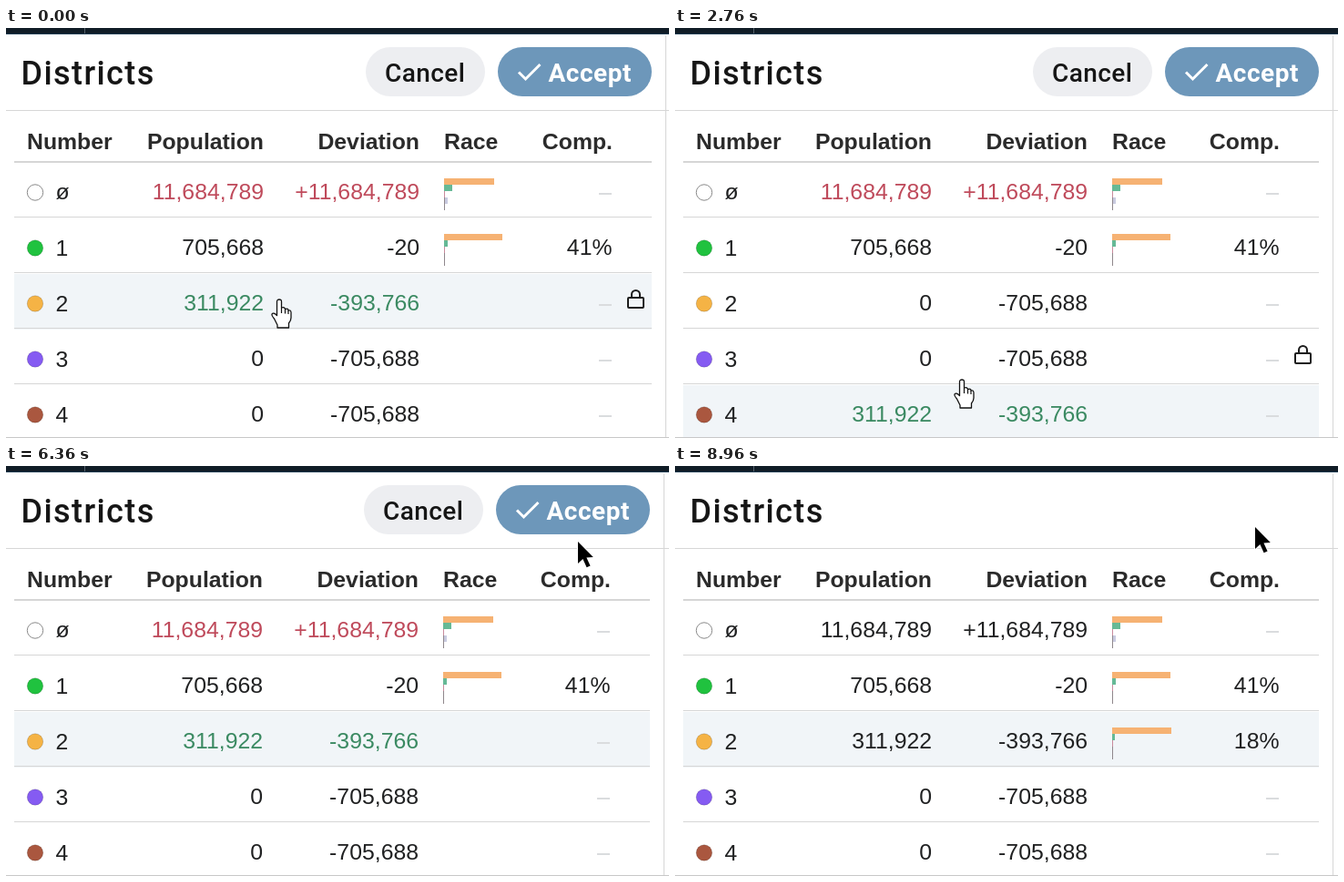
These frames come from a looping animation (728x450 px, 9.46 s). An HTML page with a canvas:

```html
<!DOCTYPE html>
<html lang="en">
<head>
<meta charset="utf-8">
<title>Districts</title>
<style>
html, body { margin: 0; width: 100%; height: 100%; overflow: hidden; background: #fff; }
canvas { display: block; width: 728px; height: 450px; }
</style>
</head>
<body>
<canvas id="stage" width="728" height="450"></canvas>
<script>
const ctx = document.getElementById('stage').getContext('2d');
const LOOP = 9460, REFLOW = 1520, HOVER = 6420, PRESS = 6640, SAVING = 7370, SAVED = 8290;
const SANS = '"Liberation Sans", Arial, sans-serif';
const UI = 'Roboto, sans-serif';
const BODY = '24.8px ' + SANS, HEAD = 'bold 24.8px ' + SANS;
const INK = '#202122', RED = '#bf4a5b', GREEN = '#3b8a62', LINE = '#d6d6d6';
const DOTS = ['#fff', '#20c23f', '#f5b345', '#855bf2', '#aa573f'];

// Which district holds the selected block, by click time
const CLICKS = [[0, 2], [1520, 3], [2510, 4], [3450, 1], [4400, 2]];

// Pointer hotspot: time, x, y, eased
const POINTER = [
  [0, 300, 298], [500, 300, 298], [900, 290, 324, 1], [1360, 305, 356, 1],
  [1520, 305, 356], [2440, 318, 417, 1], [2750, 318, 417], [2760, 315, 386],
  [3270, 312, 230], [3450, 312, 230], [3560, 311, 226], [3820, 312, 273, 1],
  [4220, 312, 306, 1], [5470, 312, 306], [5900, 450, 205, 1], [6360, 628, 83],
  [6430, 629, 73], [6810, 631, 59], [8600, 631, 59], [8960, 637, 67, 1], [LOOP, 637, 67]
];

const hand = new Path2D('M-2.5 2.5Q-2.5 0 0 0Q2.5 0 2.5 2.5V9Q6 7.8 6.5 10.5Q10 9.5 10 12' +
  'Q13 11 13 14.5V20Q13 23 10.5 26V31H-2V28L-5.5 21Q-8.5 17.5 -8 16Q-6.5 13.5 -2.5 17.5Z');
const knuckles = new Path2D('M2.5 9V15M6.5 10.5V15.5M10 12V16');
const arrow = new Path2D('M0 0V24L5.4 19L9.6 28.3L13.6 26.5L9.4 17.5L16.8 17Z');
const lockShape = new Path2D('M2 9H17Q18 9 18 10V19Q18 20 17 20H2Q1 20 1 19V10Q1 9 2 9ZM5 9V5.5A4.5 4.5 0 0 1 14 5.5V9');

const rect = (x, y, w, h, color) => { ctx.fillStyle = color; ctx.fillRect(x, y, w, h); };

function text(str, x, y, font, color, align = 'left', spacing = 0) {
  ctx.font = font;
  ctx.fillStyle = color;
  ctx.textAlign = align;
  ctx.letterSpacing = spacing + 'px';
  ctx.fillText(str, x, y);
}

function pill(x, y, w, h, color) {
  ctx.beginPath();
  ctx.roundRect(x, y, w, h, h / 2);
  ctx.fillStyle = color;
  ctx.fill();
}

function stroke(path, color, width) {
  ctx.strokeStyle = color;
  ctx.lineWidth = width;
  ctx.stroke(path);
}

function pointerAt(t) {
  const i = POINTER.findIndex(k => k[0] > t);
  const [t0, x0, y0] = POINTER[i - 1], [t1, x1, y1, eased] = POINTER[i];
  let p = (t - t0) / (t1 - t0);
  if (eased) p = p * p * (3 - 2 * p);
  return { x: x0 + (x1 - x0) * p, y: y0 + (y1 - y0) * p };
}

function raceBars(x, y, orange, green, lavender) {
  rect(x, y + 7, 1, 28, '#8f878c');
  rect(x, y, orange, 7, '#f6b273');
  rect(x, y + 7, green, 7, '#66b996');
  rect(x, y + 14, 1, 7, '#c98a9c');
  if (lavender) rect(x + 1, y + 21, lavender, 7, '#c9cbe0');
}

function header(t, dx) {
  rect(0, 0, 728, 6, '#101c26');
  rect(0, 6, 728, 1, '#1d3a50');
  rect(86, 0, 1, 6, '#53606a');
  rect(0, 90, 728, 1, LINE);
  text('Districts', 16.5, 62, '500 36px ' + UI, '#161616', 'left', 1.4);
  if (t >= SAVING) {
    if (t < SAVED) spinner(t);
    return;
  }
  pill(395 + dx, 21, 131, 54, '#edeef1');
  text('Cancel', 416 + dx, 59, '500 28px ' + UI, '#161616', 'left', 0.4);
  if (t >= PRESS) pill(536 + dx, 17, 177, 62, '#c9d9e6');
  pill(540 + dx, 21, 169, 54, t >= HOVER ? '#618eb3' : '#6d97ba');
  stroke(new Path2D(`M${563 + dx} 48.5l7.5 7.5l16 -16`), '#fff', 3);
  text('Accept', 595.5 + dx, 59, 'bold 28px ' + UI, '#fff', 'left', 0.5);
}

function spinner(t) {
  const turn = -Math.PI / 2 + (t - 7700) / 533 * Math.PI * 2;
  const ring = (from, to, color) => {
    ctx.beginPath();
    ctx.arc(686, 48, 16.2, from, to);
    ctx.strokeStyle = color;
    ctx.lineWidth = 3.6;
    ctx.stroke();
  };
  ring(0, Math.PI * 2, '#fef4ec');
  ring(turn - Math.PI / 4, turn + Math.PI / 4, '#f9bd88');
}

function rowValues(i, holder, saved) {
  if (i === 0) return ['11,684,789', '+11,684,789', saved ? INK : RED];
  const held = i === holder, color = held && !saved ? GREEN : INK;
  if (i === 1) return held ? ['1,017,590', '+311,902', color] : ['705,668', '-20', color];
  return held ? ['311,922', '-393,766', color] : ['0', '-705,688', color];
}

function row(i, t, holder, hovered, cols) {
  const mid = 180 + 61 * i, base = mid + 8, saved = t >= SAVED;
  if (i === holder) rect(9, mid - 32, cols.end - 9, 61, '#f1f5f8');
  if (i < 4) rect(9, mid + 27, cols.end - 9, 1, LINE);

  ctx.beginPath();
  ctx.arc(32, mid + 0.5, 8.7, 0, Math.PI * 2);
  ctx.fillStyle = DOTS[i];
  ctx.fill();
  ctx.strokeStyle = i ? 'rgba(0,0,0,.16)' : '#8a8a8a';
  ctx.lineWidth = 1;
  ctx.stroke();
  text(i ? String(i) : 'ø', 54.5, i ? base + 1 : base - 0.5, BODY, INK);

  const [pop, dev, color] = rowValues(i, holder, saved);
  text(pop, cols.pop, base, BODY, color, 'right');
  text(dev, cols.dev, base, BODY, color, 'right');

  if (i === 0) raceBars(cols.race, 165, 55, 9, 3);
  if (i === 1) raceBars(cols.race, 226, 64, 4);
  if (i === 2 && saved) raceBars(cols.race, 287, 65, 3);
  const comp = i === 1 ? '41%' : i === 2 && saved ? '18%' : '';
  if (comp) text(comp, cols.comp + 0.5, base, BODY, INK, 'right');
  else rect(cols.comp - 14, mid + 1, 14, 2, '#dadcde');

  if (hovered === i && i > 0) {
    ctx.save();
    ctx.translate(cols.lock, mid - 15);
    stroke(lockShape, '#1c1c1c', 2);
    ctx.restore();
  }
}

function pointer({ x, y }, isHand) {
  ctx.save();
  ctx.translate(x, y);
  ctx.lineJoin = 'round';
  if (isHand) {
    ctx.fillStyle = '#fff';
    ctx.fill(hand);
    stroke(hand, '#111', 1.3);
    stroke(knuckles, '#111', 1.2);
  } else {
    stroke(arrow, '#fff', 2);
    ctx.fillStyle = '#000';
    ctx.fill(arrow);
  }
  ctx.restore();
}

function draw(t) {
  const dx = t >= REFLOW ? -2 : 0, half = dx / 2;
  const cols = { pop: 283 + half, dev: 454 + half, race: 481 + half, comp: 665 + dx, lock: 682 + dx, end: 709 + dx };
  const holder = CLICKS.filter(c => c[0] <= t).pop()[1];
  const tip = pointerAt(t);
  const hovered = tip.y >= 147 ? Math.floor((tip.y - 147) / 61) : -1;

  rect(0, 0, 728, 450, '#fff');
  header(t, dx);
  text('Number', 23, 133, HEAD, '#2b2b2b');
  text('Population', cols.pop, 133, HEAD, '#2b2b2b', 'right');
  text('Deviation', cols.dev, 133, HEAD, '#2b2b2b', 'right');
  text('Race', cols.race, 133, HEAD, '#2b2b2b');
  text('Comp.', cols.comp + 1, 133, HEAD, '#2b2b2b', 'right');
  for (let i = 0; i < 5; i++) row(i, t, holder, hovered, cols);
  rect(9, 146, cols.end - 9, 2, LINE);
  rect(724 + dx, 8, 1, 442, LINE);
  rect(0, 449, 728, 1, '#c8c8c8');
  pointer(tip, hovered >= 0 || (t >= HOVER && t < SAVING));
}

let start;
function tick(now) {
  start ??= now;
  draw((now - start) % LOOP);
  requestAnimationFrame(tick);
}
requestAnimationFrame(tick);
</script>
</body>
</html>
```
